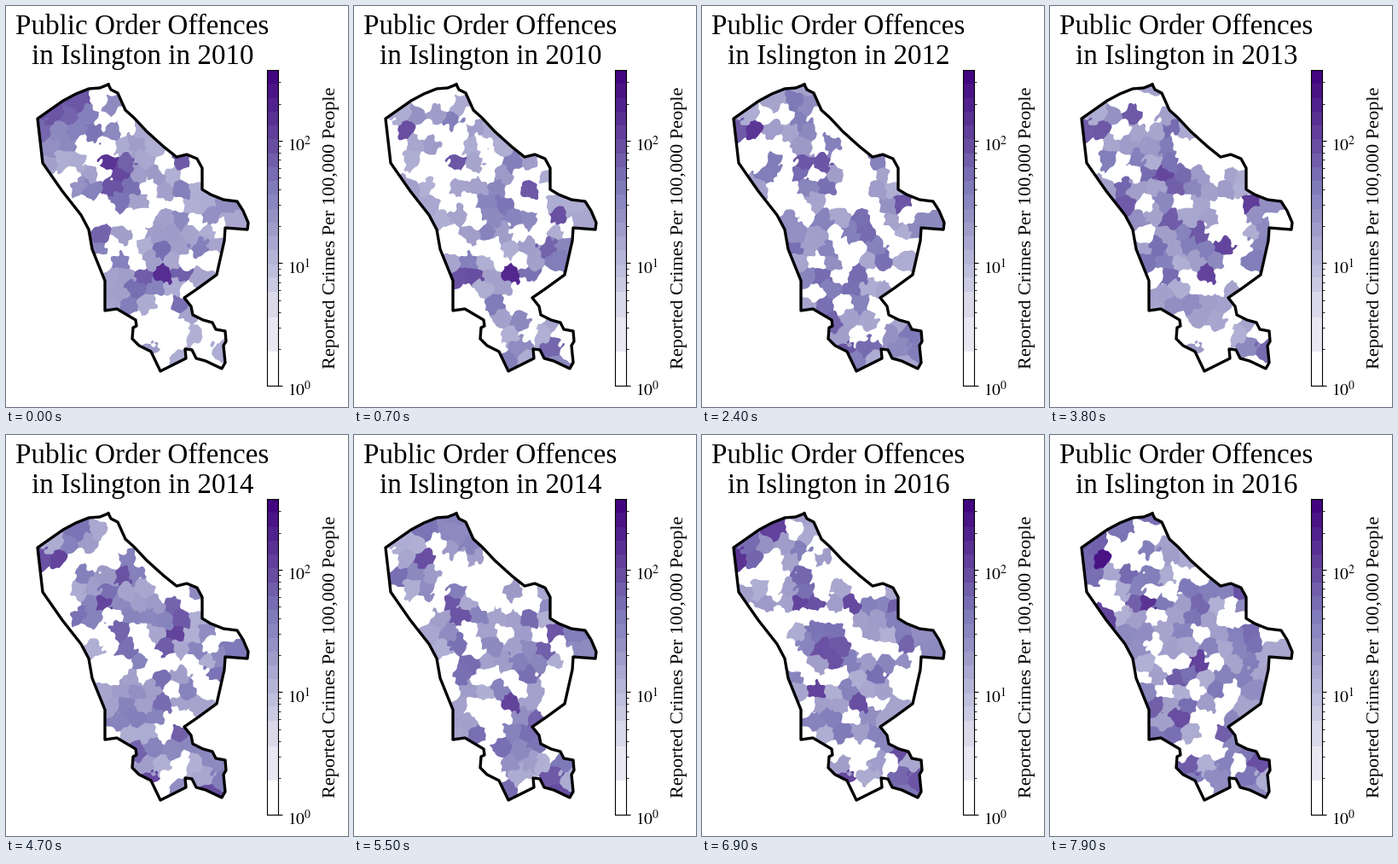
Recreate the animation shown at these times as a matplotlib script. Size 401x470 px, loop 8 s.

```python
import matplotlib.pyplot as plt
import numpy as np
from matplotlib.animation import FuncAnimation
from matplotlib.path import Path

W, H, DPI = 401, 470, 100
MONTHS = 80
SS = 3                                  # supersampling of the map
LEFT, TOP, RIGHT, BOTTOM = 34, 89, 288, 432
TOP_VALUE = 378                         # upper end of the colour scale
UNIT = 15                               # one crime, per 100,000 people

plt.rcParams.update({"font.family": "Liberation Serif",
                     "mathtext.fontset": "stix"})

BORDER = [
    (120, 92), (123, 98), (131, 102), (140, 122), (150, 131), (165, 147),
    (185, 165), (200, 177), (212, 174), (224, 179), (230, 190), (230, 215),
    (240, 221), (255, 227), (271, 229), (278, 240), (284, 254), (283, 262),
    (257, 260), (256, 275), (247, 315), (225, 331), (209, 342), (217, 352),
    (219, 362), (231, 368), (242, 371), (246, 379), (257, 381), (258, 393),
    (255, 398), (257, 418), (253, 425), (234, 416), (223, 413), (218, 403),
    (210, 402), (211, 413), (181, 428), (170, 405), (156, 398), (148, 390),
    (149, 377), (153, 375), (152, 368), (130, 355), (116, 357), (116, 322),
    (101, 285), (97, 262), (88, 245), (66, 217), (43, 184), (37, 132),
    (67, 111), (82, 103), (97, 97), (110, 96),
]

# Busy places: x, y and extra crimes per month.
HOTSPOTS = [(52, 145, 6), (76, 111, 3), (124, 190, 6), (150, 220, 3),
            (170, 255, 4), (184, 318, 3), (152, 338, 4), (240, 236, 3),
            (246, 402, 4)]

purples = plt.get_cmap("Purples")
outline = Path(BORDER)


def make_sites(rng, dx=20, dy=17, jitter=5):
    """Area centres: a shaken triangular lattice cut to the border."""
    sites = []
    for row, y in enumerate(range(TOP + 6, BOTTOM, dy)):
        for x in range(LEFT + row % 2 * dx // 2, RIGHT, dx):
            sites.append((x, y) + rng.uniform(-jitter, jitter, 2))
    sites = np.array(sites)
    return sites[outline.contains_points(sites)]


def ripple(x, y, rng, waves=5):
    """Small irregular displacement that makes the area edges ragged."""
    out = np.zeros_like(x)
    for _ in range(waves):
        k = 2 * np.pi / rng.uniform(7, 20)
        a, phase = rng.uniform(0, 2 * np.pi, 2)
        out += 1.1 * np.sin(k * (x * np.cos(a) + y * np.sin(a)) + phase)
    return out


def area_map(sites, rng):
    """Index of the area under each subpixel; the last index is outside."""
    x, y = np.meshgrid(np.arange(LEFT, RIGHT, 1 / SS) + 0.5 / SS,
                       np.arange(TOP, BOTTOM, 1 / SS) + 0.5 / SS)
    wx, wy = x + ripple(x, y, rng), y + ripple(x, y, rng)
    best = np.full(x.shape, np.inf)
    area = np.zeros(x.shape, int)
    for i, (sx, sy) in enumerate(sites):
        dist = (wx - sx) ** 2 + (wy - sy) ** 2
        near = dist < best
        best[near] = dist[near]
        area[near] = i
    inside = outline.contains_points(np.c_[x.ravel(), y.ravel()])
    area[~inside.reshape(x.shape)] = len(sites)
    return area


def busyness(sites):
    extra = np.zeros(len(sites))
    for x, y, crimes in HOTSPOTS:
        d2 = ((sites - (x, y)) ** 2).sum(axis=1)
        extra += crimes * np.exp(-d2 / (2 * 9 ** 2))
    return extra


rng = np.random.default_rng(4)
SITES = make_sites(rng)
AREA = area_map(SITES, rng)
EXTRA = busyness(SITES)
PER_CRIME = UNIT * rng.uniform(0.8, 1.3, len(SITES))


def month_colours(month):
    """Random crime counts, slowly rising over the years."""
    rng = np.random.default_rng(100 + month)
    rate = 0.7 + 0.7 * month / MONTHS + EXTRA
    crimes = rng.poisson(rate * rng.gamma(2, 0.5, len(SITES)))
    values = np.maximum(crimes * PER_CRIME, 1)
    colours = purples(np.log(values) / np.log(TOP_VALUE))[:, :3]
    colours[crimes == 0] = 1
    return np.vstack([colours, np.ones(3)])


def render(month):
    fine = month_colours(month)[AREA]
    h, w = AREA.shape
    return fine.reshape(h // SS, SS, w // SS, SS, 3).mean(axis=(1, 3))


fig = plt.figure(figsize=(W / DPI, H / DPI), dpi=DPI, facecolor="white")
ax = fig.add_axes([0, 0, 1, 1])
picture = ax.imshow(render(0), extent=(LEFT, RIGHT, BOTTOM, TOP),
                    interpolation="nearest", aspect="auto")
ax.plot(*zip(*BORDER, BORDER[0]), color="black", lw=2.4,
        solid_joinstyle="round")
ax.set(xlim=(0, W), ylim=(H, 0))
ax.axis("off")

ax.text(160, 33, "Public Order Offences", size=23.9, ha="center")
title = ax.text(160, 68, "", size=23.9, ha="center")
ax.text(386, 260, "Reported Crimes Per 100,000 People", size=16,
        rotation=90, rotation_mode="anchor", ha="center")

# Colour scale
bar = fig.add_axes([306 / W, 25 / H, 13 / W, 370 / H])
steps = np.r_[0, 0.108, 0.216, 0.297, 0.343, np.linspace(0.385, 1, 15)]
edges = TOP_VALUE ** steps
shades = purples((steps[:-1] + steps[1:]) / 2)
shades[0] = 1
bar.set_yscale("log")
bar.bar(0.5, np.diff(edges), bottom=edges[:-1], width=1, color=shades,
        antialiased=False)
bar.set(xlim=(0, 1), ylim=(1, TOP_VALUE), xticks=[])
bar.yaxis.tick_right()
bar.tick_params(axis="y", which="both", labelright=False)
for power in range(3):
    y = 445 - 370 * power * np.log(10) / np.log(TOP_VALUE)
    ax.text(330, y + 12, f"$10^{power}$", size=14)


def update(month):
    picture.set_data(render(month))
    title.set_text(f"in Islington in {2010 + (month + 3) // 12}")
    return picture, title


anim = FuncAnimation(fig, update, frames=MONTHS, interval=100, repeat=True,
                     repeat_delay=0, blit=False)
plt.show()
```
